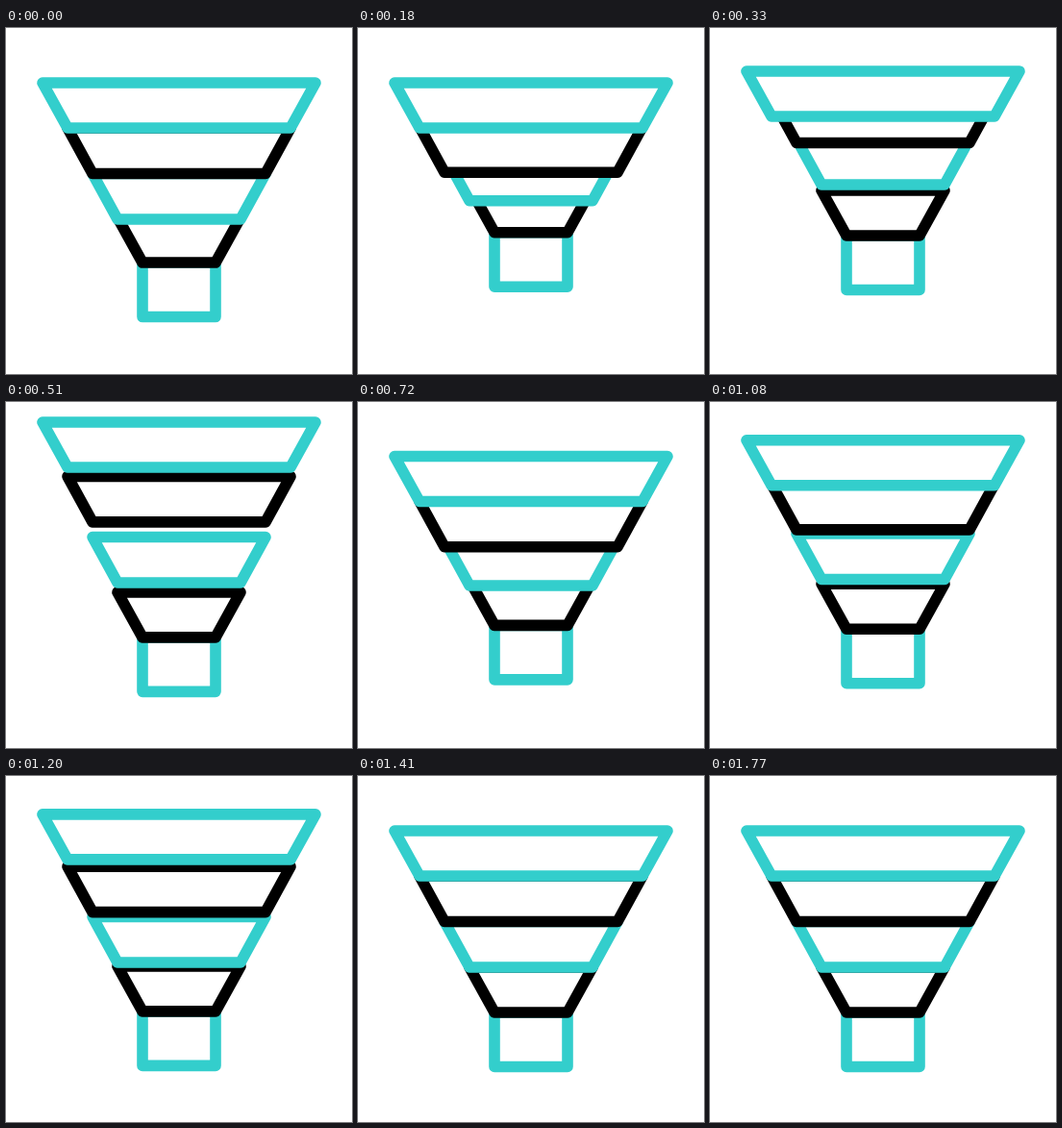
These frames come from a looping animation (360x360 px, 1.8 s). An HTML page:

```html
<!DOCTYPE html>
<html lang="en">
<head>
<meta charset="utf-8">
<title>Bouncing funnel</title>
<style>
  html, body { margin: 0; height: 100%; overflow: hidden; background: #fff; }
  svg { display: block; width: 100vw; height: 100vh; }
  path { fill: #fff; stroke: #33cecc; stroke-width: 11.6; stroke-linejoin: round; }
  .dark { stroke: #000; }
</style>
</head>
<body>
<svg viewBox="0 0 360 360">
  <g class="layer">
    <path d="M142 246H218V302.5H142Z"/>
    <path class="dark" d="M116 199H244L218 246H142Z"/>
  </g>
  <path class="layer" d="M90 151.5H270L244 199H116Z"/>
  <path class="layer dark" d="M64 104H296L270 151.5H90Z"/>
  <path class="layer" d="M38 57H322L296 104H64Z"/>
</svg>
<script>
const LOOP = 1800;
const layers = document.querySelectorAll('.layer');

// Start, peak and end (ms) of the high and the low hop, bottom layer first
const hops = [
  [[-17, 236, 523], [525, 870, 1225]],
  [[70, 330, 574], [600, 950, 1276]],
  [[170, 388, 680], [700, 1052, 1304]],
  [[260, 507, 725], [860, 1150, 1350]]
];
const heights = [36, 19];

function lift(t, [start, peak, end]) {
  if (t <= start || t >= end) return 0;
  const u = t < peak ? (t - start) / (peak - start) : (end - t) / (end - peak);
  return Math.sin(u * Math.PI / 2) ** 1.3;
}

function draw(now) {
  const t = now % LOOP;
  layers.forEach((layer, i) => {
    // The lowest layer takes off just before the loop restarts
    const y = hops[i].reduce((sum, hop, k) =>
      sum + heights[k] * (lift(t, hop) + lift(t - LOOP, hop)), 0);
    layer.setAttribute('transform', `translate(0 ${-y.toFixed(2)})`);
  });
}

let origin;
function tick(now) {
  origin ??= now;
  draw(now - origin);
  requestAnimationFrame(tick);
}
draw(0);
requestAnimationFrame(tick);
</script>
</body>
</html>
```
